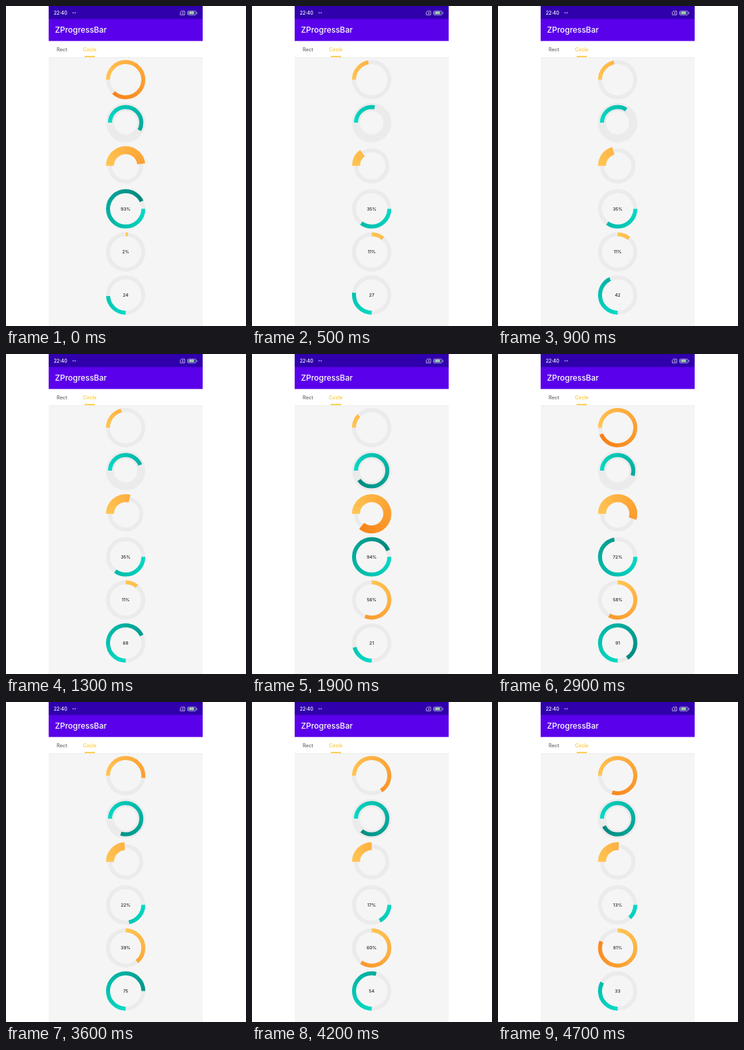
Write an HTML page with a canvas that moves like this. It is 360 px wide and 480 px high and loops after 4.8 s.

```html
<!DOCTYPE html>
<html lang="en">
<head>
<meta charset="utf-8">
<title>Circle progress bars</title>
<style>
  html, body { margin: 0; width: 360px; height: 480px; overflow: hidden; background: #fff; }
  svg, canvas { position: absolute; left: 0; top: 0; }
  text { font-family: Inter, sans-serif; font-weight: 500; }
  .label { font-size: 6.6px; fill: #222; text-anchor: middle; }
</style>
</head>
<body>
<svg width="360" height="480">
  <path fill="#f5f5f5" d="M64 77h231v403H64z"/>
  <path fill="#ececec" d="M64 77h231v1H64z"/>
  <path fill="#5a00eb" d="M64 0h231v52.4H64z"/>
  <path fill="#3000ac" d="M64 0h231v19.5H64z"/>
  <g fill="#fff">
    <text x="71.7" y="13" font-size="7.1">22:40</text>
    <circle cx="100.7" cy="10.3" r=".8"/>
    <circle cx="103.7" cy="10.3" r=".8"/>
    <text x="73.5" y="40.2" font-size="11.9">ZProgressBar</text>
  </g>
  <g fill="none" stroke="#d9d0f2" stroke-width=".8">
    <path d="M263 7.7h5v5.6h-6.6v-3.8zM263.7 9.3l2.6 2.6m0-2.6l-2.6 2.6"/>
    <rect x="272.4" y="7.7" width="12.6" height="5.6" rx="1.4"/>
    <path d="M286.4 9.4v2.2"/>
  </g>
  <rect x="273.6" y="8.8" width="9" height="3.4" fill="#6cc07c"/>
  <text x="278.5" y="12" font-size="4.2" fill="#fff" text-anchor="middle">80</text>
  <text x="76" y="67.7" font-size="7.3" fill="#666">Rect</text>
  <text x="115.6" y="67.7" font-size="7.3" fill="#fbc52d">Circle</text>
  <rect x="118" y="74.9" width="15.5" height="1.7" fill="#fbc52d"/>
</svg>
<canvas width="360" height="480"></canvas>
<script>
const LOOP = 4800, TICK = 100, REST = 100, TURN = Math.PI * 2;
const CX = 179.5, TOP = 110.5, GAP = 64.6;
const TRACK = '#ebebeb', PALETTES = [['#ffc553', '#f8780f'], ['#03dac5', '#018078']];

// Every ring heads for its next stop at these moments
const moments = [0, 500, 1300, 1900, 2900, 3600, 4700];

// start: turns clockwise from the right; stops: percent
const rings = [
  { start: .5, stops: [87, 22, 21, 12, 94, 52, 80] },
  { start: .5, stops: [58, 28, 44, 90, 55, 80, 92], r: 23.5, track: 12 },
  { start: .5, stops: [48, 15, 29, 86, 55, 24, 26], r: 23.5, width: 12 },
  { start: 0, stops: [93, 35, 35, 94, 72, 22, 13], unit: '%' },
  { start: .75, stops: [2, 11, 11, 56, 58, 39, 81], unit: '%' },
  { start: .25, stops: [24, 27, 68, 21, 91, 75, 33], unit: '' }
].map((ring, i) => ({ r: 26.5, track: 6, width: 6, y: TOP + i * GAP, colors: PALETTES[i % 2], ...ring }));

const ctx = document.querySelector('canvas').getContext('2d');
const svg = document.querySelector('svg');

for (const ring of rings) {
  ring.paint = ctx.createConicGradient(ring.start * TURN, CX, ring.y);
  ring.colors.forEach((color, i) => ring.paint.addColorStop(i, color));
  if (ring.unit === undefined) continue;
  ring.label = document.createElementNS('http://www.w3.org/2000/svg', 'text');
  ring.label.setAttribute('class', 'label');
  ring.label.setAttribute('x', CX);
  ring.label.setAttribute('y', ring.y + 2.4);
  svg.append(ring.label);
}

function arc(ring, turns, width, style) {
  const from = ring.start * TURN;
  ctx.beginPath();
  ctx.arc(CX, ring.y, ring.r, from, from + turns * TURN);
  ctx.lineWidth = width;
  ctx.strokeStyle = style;
  ctx.stroke();
}

// Rest briefly at a stop, then ease to the next
function valueAt(stops, time) {
  const i = moments.findLastIndex(moment => moment <= time);
  if (i === moments.length - 1) return stops[i];
  const begin = moments[i] + REST;
  const part = Math.max(0, (time - begin) / (moments[i + 1] - begin));
  return stops[i] + (stops[i + 1] - stops[i]) * (1 - Math.cos(Math.PI * part)) / 2;
}

function draw() {
  const time = Math.floor(performance.now() % LOOP / TICK) * TICK;
  ctx.clearRect(0, 0, 360, 480);
  for (const ring of rings) {
    const value = valueAt(ring.stops, time);
    arc(ring, 1, ring.track, TRACK);
    arc(ring, value / 100, ring.width, ring.paint);
    if (ring.label) ring.label.textContent = Math.floor(value) + ring.unit;
  }
  requestAnimationFrame(draw);
}
draw();
</script>
</body>
</html>
```
